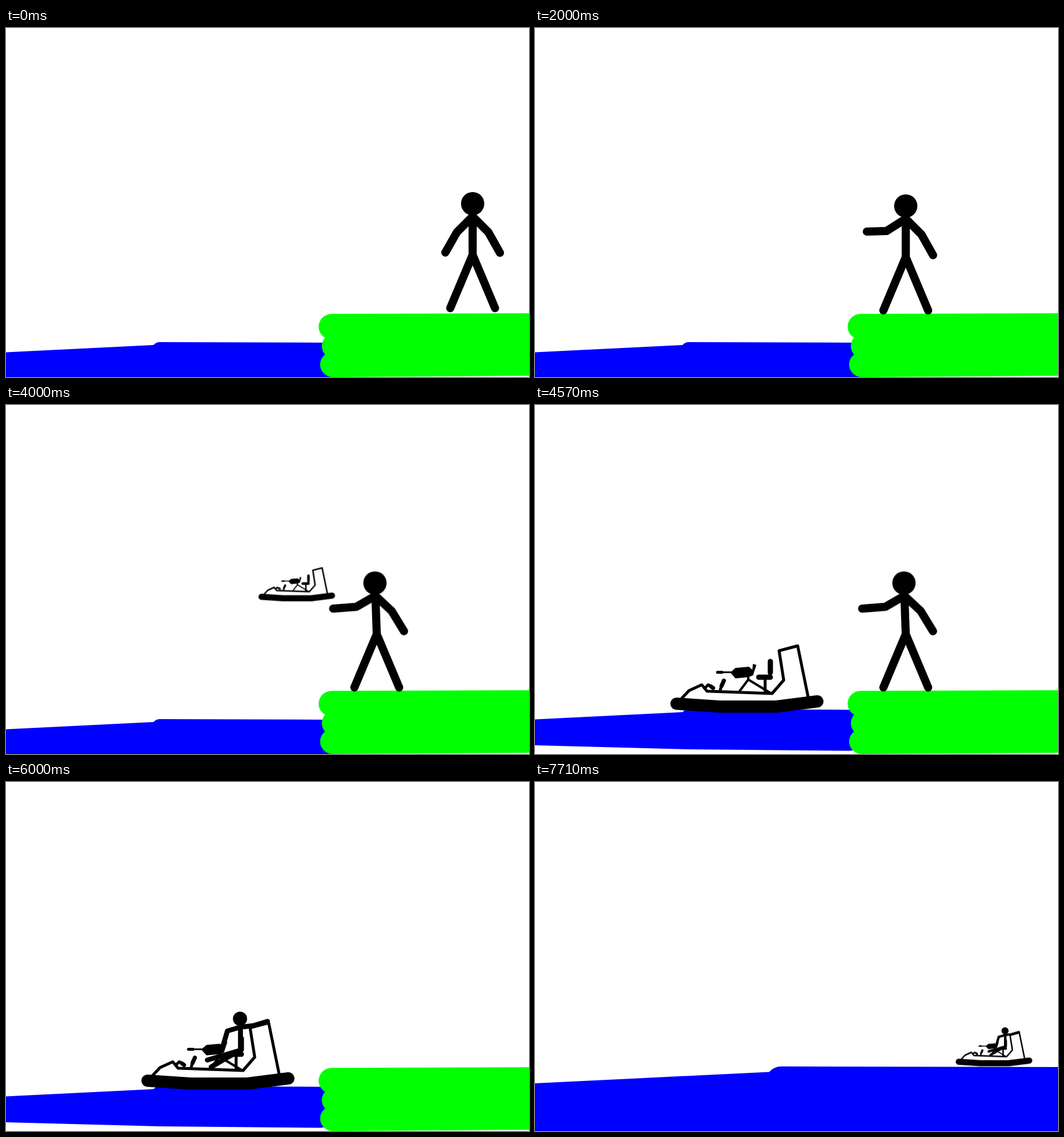
Animation, 900 px wide and 600 px high, one loop 8 s. Source, as an HTML page without scripts:

```html
<!DOCTYPE html>
<html lang="en">
<head>
<meta charset="utf-8">
<title>Pocket hovercraft</title>
<style>
  html, body { margin: 0; width: 100%; height: 100%; overflow: hidden; background: #fff; }
  svg { display: block; width: 100%; height: 100%; }
  path { fill: none; stroke: #000; stroke-linecap: round; stroke-linejoin: round; }

  .blue { fill: #00f; stroke: none; }
  .land path { stroke: #0f0; stroke-width: 43; }
  .solid { fill: #000; stroke: none; }
  .man path { stroke-width: 14; }
  .driver path { stroke-width: 8.5; }
  .w3 { stroke-width: 3; }
  .w4 { stroke-width: 4; }
  .w5 { stroke-width: 5; }
  .w7 { stroke-width: 7; }
  .w9 { stroke-width: 9; }
  .hull { stroke-width: 21; }

  .shore, .sea, .swell, .man, .upper, .legs, .arm, .boat, .driver {
    animation: 8s step-end infinite;
  }
  .shore { animation-name: shore; }
  .sea { animation-name: sea; }
  .swell { animation-name: swell; }
  .man { animation-name: man; }
  .upper { animation-name: lean; transform-origin: 638px 394px; }
  .legs { animation-name: legs; }
  .arm { animation-name: arm; }
  .boat { animation-name: boat; }
  .driver { animation-name: driver; }

  @keyframes shore { 0% { visibility: visible; } 92.8%, 100% { visibility: hidden; } }
  @keyframes sea { 0% { visibility: hidden; } 92.8%, 100% { visibility: visible; } }
  @keyframes driver { 0% { visibility: hidden; } 71.3%, 100% { visibility: visible; } }

  @keyframes swell {
    0% { transform: translateY(17px); }
    57.1% { transform: none; }
    71.3% { transform: translateY(10px); }
    74.9%, 100% { transform: none; }
  }

  /* walk in, step back for a run-up, leap aboard */
  @keyframes man {
    0% { transform: translate(165px, -4px); visibility: visible; }
    3.6% { transform: translate(110px, -3px); visibility: visible; }
    7.1% { transform: translate(55px, -1px); visibility: visible; }
    10.7% { transform: none; visibility: visible; }
    60.7% { transform: translate(85px, 0); visibility: visible; }
    64.2% { transform: translate(170px, 0); visibility: visible; }
    67.8% { transform: translate(-130px, -104px); visibility: visible; }
    71.3%, 100% { transform: none; visibility: hidden; }
  }
  @keyframes lean {
    0% { transform: none; }
    49.9% { transform: rotate(-2deg); }
    60.7%, 100% { transform: none; }
  }
  @keyframes legs {
    0%, 7.1%, 64.2% { d: path("M599.5 485.5L638 394L676.5 485.5"); }
    3.6%, 60.7% { d: path("M622 485.5L638 394L655 485.5"); }
    67.8%, 100% { d: path("M603 465L638 394L690 462"); }
  }
  @keyframes arm {
    0%, 28.6%, 60.7% { d: path("M638 328L611 355L591 390"); }
    10.7% { d: path("M638 328L605 349L621 312"); }
    24.9% { d: path("M638 328L605 349L571 350"); }
    32.1% { d: path("M638 328L611 356L631 390"); }
    42.8% { d: path("M638 328L605 349L571 360"); }
    46.3% { d: path("M638 328L612 298L600 262"); }
    49.9% { d: path("M638 328L604.6 345.8L564.5 347.4"); }
    67.8%, 100% { d: path("M638 328L600 318L575 288"); }
  }

  /* pulled out, thrown, grows, floats, drives off */
  @keyframes boat {
    0% { visibility: hidden; transform: none; }
    39.2% { visibility: visible; transform: translate(513.7px, 260.6px) scale(.25); }
    42.8% { visibility: visible; transform: translate(454px, 231px) scale(.25); }
    46.3% { visibility: visible; transform: translate(499px, 109px) scale(.25); }
    49.9% { visibility: visible; transform: translate(318px, 73px) scale(.5); }
    53.6% { visibility: visible; transform: translate(119px, 19px) scale(.8); }
    57.1% { visibility: visible; transform: none; }
    71.3% { visibility: visible; transform: translate(0, 10px); }
    74.9% { visibility: visible; transform: none; }
    78.6% { visibility: visible; transform: translate(-60px, 0); }
    82.1% { visibility: visible; transform: translate(-200px, 0); }
    85.7% { visibility: visible; transform: translate(-420px, 0); }
    89.2% { visibility: visible; transform: translate(-600px, 0); }
    92.8% { visibility: visible; transform: translate(702.5px, 224.2px) scale(.5); }
    96.3%, 100% { visibility: visible; transform: translate(607.5px, 224.2px) scale(.5); }
  }
</style>
</head>
<body>
<svg viewBox="0 0 900 600">
  <g class="shore">
    <g class="swell">
      <path class="blue" d="M0 540.5L254 528Q258 523 265 523L548 524L566 540V575Q558 594 541 594.5L265 592L0 585Z"/>
    </g>
    <g class="land">
      <path d="M560 513.5L930 512.3" style="stroke-width:44"/>
      <path d="M565 547H930"/>
      <path d="M562 578.5L930 576.3"/>
    </g>
  </g>

  <path class="blue sea" d="M0 518L403 498.5Q411 489 424 489L900 490V600H0Z"/>

  <g class="boat">
    <path class="w5" d="M250 507L265 491L287 481L296 492L408 496L428 473L420 422.5L452 414L470 502"/>
    <path class="hull" d="M243.5 513.5L318 518.5H415L486 509.5"/>
    <path class="w5" d="M292 487L298 481L303 483.5"/>
    <path class="w7" d="M303 484L306.5 486.5M325 474L321 483"/>
    <path class="w5" d="M321 483L319 489"/>
    <!-- gun and tripod -->
    <path class="w5" d="M314 459.5H322"/>
    <path class="w3" d="M322 459.5H340"/>
    <path class="solid" d="M336 460L345 452L368 450L374 455L375 445L381 447L375 465L366 468L345 470Z"/>
    <path class="w4" d="M352 492L367 472L405 495M367 472V466"/>
    <!-- seat -->
    <path class="w9" d="M405 441V460M385 468H405"/>
    <path class="w5" d="M396 470V493"/>
    <g class="driver">
      <circle cx="402.7" cy="407" r="12.2"/>
      <path d="M403.5 416V463M373 455L381 428L403 421.5L425 419L450 411.5"/>
      <path d="M346.5 478L404 461L380 474L353 490"/>
    </g>
  </g>

  <g class="man">
    <path class="legs" d="M599.5 485.5L638 394L676.5 485.5"/>
    <g class="upper">
      <circle cx="638" cy="306" r="20"/>
      <path d="M638 320V394M638 328L665 355L685 390.5"/>
      <path class="arm" d="M638 328L611 355L591 390"/>
    </g>
  </g>
</svg>
</body>
</html>
```
